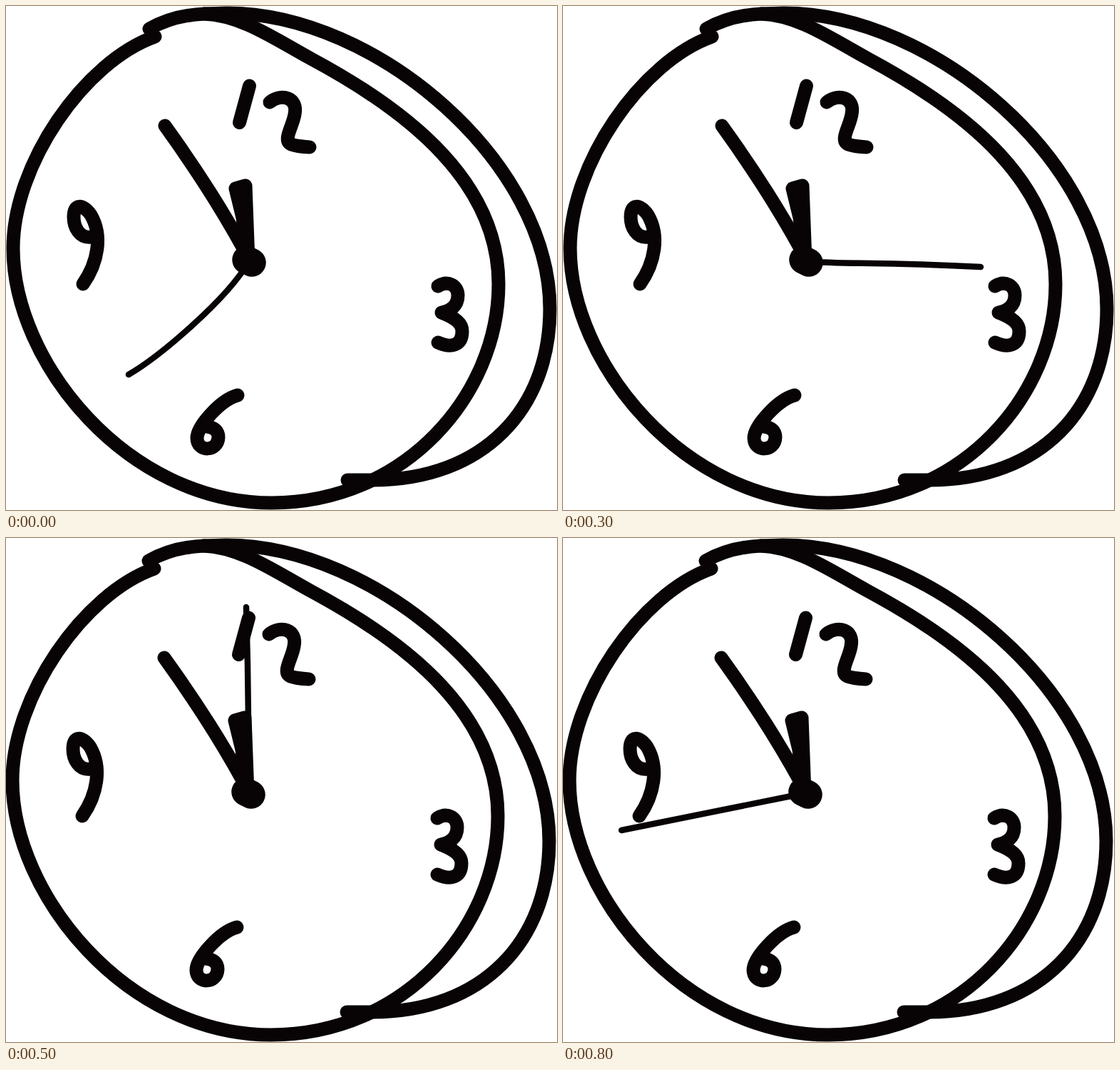
Recreate the animation shown at these times as an HTML page. Size 773 px wide and 707 px high, loop 900 ms.

```html
<!DOCTYPE html>
<html lang="en">
<head>
<meta charset="utf-8">
<title>Hand-drawn clock</title>
<style>
  html, body { margin: 0; width: 100%; height: 100%; overflow: hidden; background: #fff; }
  svg { display: block; width: 100%; height: 100%; }
  path { fill: none; stroke: #080405; stroke-width: 19; stroke-linecap: round; stroke-linejoin: round; }
  #hour { fill: #080405; }
  #hub { stroke-width: 39.5; }
  #clock { animation: wobble 300ms step-end infinite; }
  #ticks path {
    stroke-width: 8.5;
    visibility: hidden;
    animation: tick 900ms calc(var(--i) * 100ms - 900ms) step-end infinite;
  }
  @keyframes wobble {
    0% { transform: translateX(0); }
    33.3333% { transform: translateX(-.5px); }
    66.6666%, 100% { transform: translateX(-1px); }
  }
  @keyframes tick {
    0% { visibility: visible; }
    11.1111%, 100% { visibility: hidden; }
  }
</style>
</head>
<body>
<svg viewBox="0 0 773 707">
  <g id="clock">
    <path id="rim" d="M201 32Q235 13 278 11L310 10C520 10 763 220 763 425C763 565 670 665 515 665H479"/>
    <path id="face" d="M278 11C330 13 375 45 428 74C570 150 691 250 691 390C691 545 560 697 373 697C170 697 10 500 10 340C10 222 110 78 209 43"/>

    <g id="numerals">
      <path d="M341.5 112L327.5 163.5"/>
      <path d="M370 135C386 122 410 128 405 152C402 170 388 188 400 194Q408 197 426 198"/>
      <path d="M606 393C620 384 634 392 634 406C634 422 622 428 611 430C632 438 640 446 640 456C640 477 624 480 606 472"/>
      <path d="M325 546C300 553 268 590 268 606C268 626 297 626 298 605Q298 592 282 590"/>
      <path d="M119 324C103 326 95 310 95 296C95 276 108 278 119 293C136 322 129 360 108 390"/>
    </g>

    <path id="minute" d="M223 168Q288 258 334 342"/>
    <path id="hour" d="M322 256L336 252L339.5 345H337L332 297Z"/>
    <path id="hub" d="M337 356L345 360"/>

    <!-- The second hand, one sketch per tick -->
    <g id="ticks">
      <path style="--i:0" d="M341 358C310 412 215 492 172 517"/>
      <path style="--i:1" d="M341 358Q338 440 322 572"/>
      <path style="--i:2" d="M341 358C385 400 375 435 450 545"/>
      <path style="--i:3" d="M341 358C400 363 430 358 586 366"/>
      <path style="--i:4" d="M341 358L514 190"/>
      <path style="--i:5" d="M341 358Q342 230 338 97"/>
      <path style="--i:6" d="M341 358C275 297 205 242 145 206"/>
      <path style="--i:7" d="M341 358Q200 330 84 298"/>
      <path style="--i:8" d="M341 358L83 410"/>
    </g>
  </g>
</svg>
</body>
</html>
```
